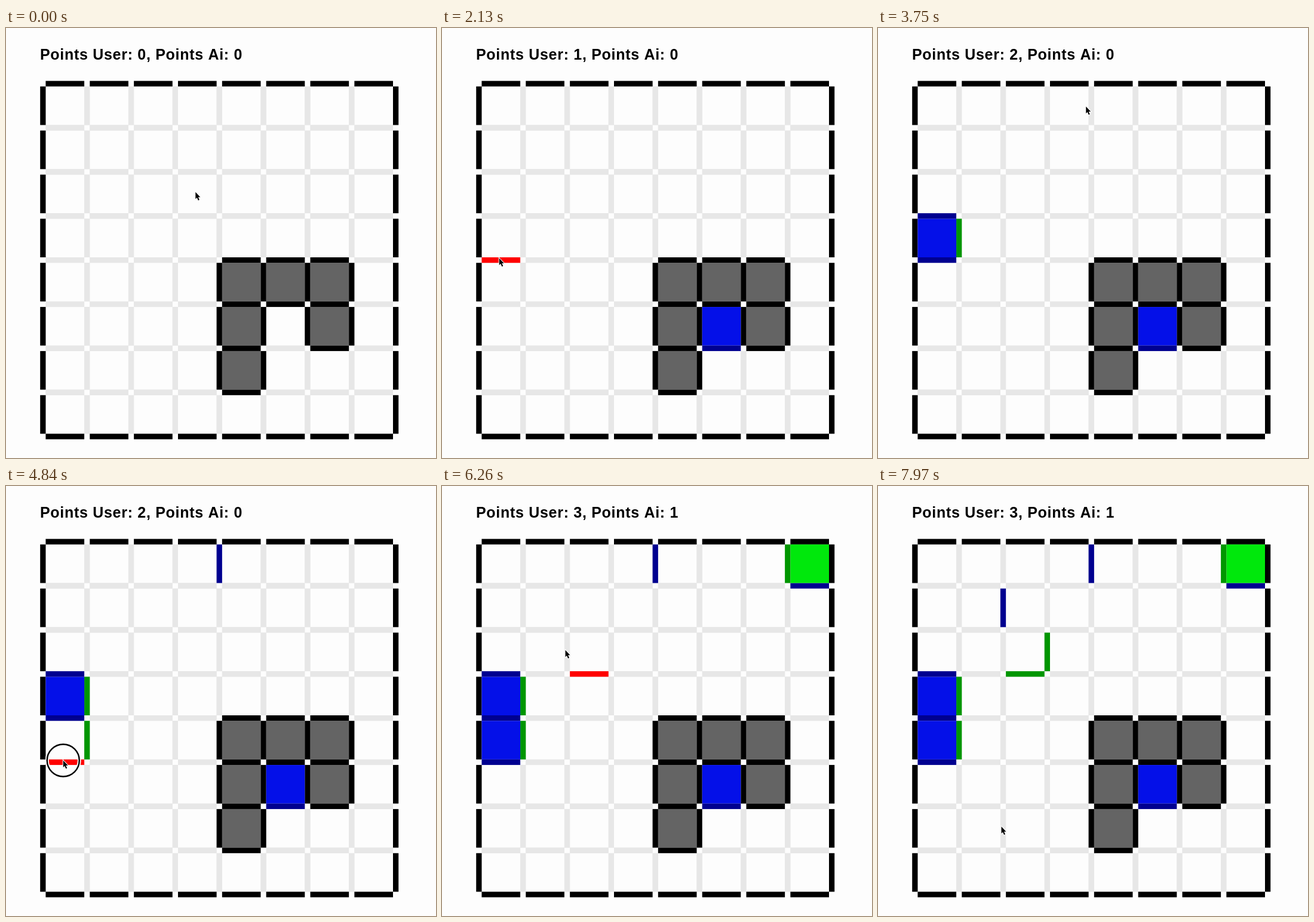
An HTML page with a canvas for the animation above (8 s loop, 720x720 px).

```html
<!DOCTYPE html>
<html lang="en">
<head>
<meta charset="utf-8">
<title>Dots and boxes</title>
<style>
  html, body { margin: 0; width: 100%; height: 100%; overflow: hidden; background: #fdfdfd; }
  canvas { display: block; width: 720px; height: 720px; }
</style>
</head>
<body>
<canvas id="stage" width="720" height="720"></canvas>
<script>
const ctx = document.getElementById('stage').getContext('2d');
const LOOP = 8000, SIZE = 8;
const UNIT = 720 / 390, PITCH = 40 * UNIT, THICK = 5 * UNIT, LEFT = 31 * UNIT, TOP = 48 * UNIT;
const HOLD = 250, LEAVE = 230, PRESS = 150, FLASH = 430;
const COLOR = {
  back: '#fdfdfd', free: '#e7e7e7', wall: '#000', block: '#646464', active: '#f00',
  userLine: '#000090', aiLine: '#009600', userCell: '#0410e8', aiCell: '#00e80c'
};
const BLOCKED = ['4,4', '5,4', '6,4', '4,5', '6,5', '4,6'];

// Spots: h and v are the lines above and left of a cell, c is the cell itself.
const script = [
  [0, 'rest', 'c3,2'],
  [960, 'user', 'h5,6'],
  [2340, 'user', 'h0,4'], [2380, 'ai', 'v1,3'],
  [3130, 'user', 'h0,3'],
  [4040, 'user', 'v4,0'], [4080, 'ai', 'v1,4'],
  [4930, 'user', 'h0,5'],
  [5600, 'user', 'h7,1'], [5640, 'ai', 'v7,0'], [6060, 'ai', 'h2,3'],
  [6300, 'rest', 'v2,2'],
  [6950, 'user', 'v2,1'], [6990, 'ai', 'v3,2'],
  [8200, 'rest', 'v2,6']
].map(([at, who, spot]) => ({ at, who, spot }));
const moves = script.filter(step => step.who !== 'rest');
const stops = script.filter(step => step.who !== 'ai');

const parse = key => key.split(',').map(Number);
const edgesOf = (col, row) =>
  [`h${col},${row}`, `h${col},${row + 1}`, `v${col},${row}`, `v${col + 1},${row}`];

const cells = [], walls = new Set();
for (let i = 0; i < SIZE; i++) {
  for (let j = 0; j < SIZE; j++) cells.push(`${i},${j}`);
  for (const edge of [`h${i},0`, `h${i},${SIZE}`, `v0,${i}`, `v${SIZE},${i}`]) walls.add(edge);
}
for (const key of BLOCKED) edgesOf(...parse(key)).forEach(edge => walls.add(edge));
const openCells = cells.filter(key => !BLOCKED.includes(key));

function rectOf(spot) {
  const [col, row] = parse(spot.slice(1));
  const x = LEFT + PITCH * col, y = TOP + PITCH * row, inner = PITCH - THICK;
  return [
    spot[0] === 'v' ? x : x + THICK,
    spot[0] === 'h' ? y : y + THICK,
    spot[0] === 'v' ? THICK : inner,
    spot[0] === 'h' ? THICK : inner
  ];
}

function paint(spot, color) {
  ctx.fillStyle = color;
  ctx.fillRect(...rectOf(spot));
}

function drawBoard() {
  for (const key of cells) edgesOf(...parse(key)).forEach(edge => paint(edge, COLOR.free));
  for (const key of BLOCKED) paint('c' + key, COLOR.block);
  for (const edge of walls) paint(edge, COLOR.wall);
}

// The player who closes a cell owns it.
function drawMoves(t) {
  const taken = new Set(walls), owned = new Set(), score = { user: 0, ai: 0 };
  for (const { at, who, spot } of moves) {
    const placed = t >= at;
    if (placed) {
      taken.add(spot);
      for (const key of openCells) {
        if (owned.has(key) || !edgesOf(...parse(key)).every(edge => taken.has(edge))) continue;
        owned.add(key);
        score[who]++;
        paint('c' + key, COLOR[who + 'Cell']);
      }
    }
    const start = who === 'user' ? at - HOLD : at;
    const end = who === 'user' ? at : at + FLASH;
    if (t >= start && t < end) paint(spot, COLOR.active);
    else if (placed) paint(spot, COLOR[who + 'Line']);
  }
  return score;
}

function aim(spot) {
  const [x, y, w, h] = rectOf(spot);
  return [x + w / 2 - 3, y + h / 2 - 3];
}

function pointerAt(t) {
  const i = stops.findIndex(stop => stop.at > t);
  const from = stops[i - 1], to = stops[i];
  const start = from.at + LEAVE, end = to.at - HOLD;
  const p = Math.min(1, Math.max(0, (t - start) / (end - start)));
  const ease = p * p * (3 - 2 * p);
  const [x0, y0] = aim(from.spot), [x1, y1] = aim(to.spot);
  return [x0 + (x1 - x0) * ease, y0 + (y1 - y0) * ease];
}

function drawRing(x, y) {
  ctx.beginPath();
  ctx.arc(x, y, 27, 0, Math.PI * 2);
  for (const [color, width] of [[COLOR.back, 6], ['#000', 2.4]]) {
    ctx.strokeStyle = color;
    ctx.lineWidth = width;
    ctx.stroke();
  }
}

const arrow = new Path2D('M0 0V11.5L2.5 9.2L4.5 13.8L6.5 13L4.5 8.5H8Z');
function drawPointer(x, y) {
  ctx.save();
  ctx.translate(x, y);
  ctx.strokeStyle = COLOR.back;
  ctx.lineWidth = 2;
  ctx.stroke(arrow);
  ctx.fillStyle = '#000';
  ctx.fill(arrow);
  ctx.restore();
}

function frame(now) {
  const t = now % LOOP;
  ctx.fillStyle = COLOR.back;
  ctx.fillRect(0, 0, 720, 720);
  drawBoard();
  const score = drawMoves(t);

  ctx.fillStyle = '#000';
  ctx.font = 'bold 25px "Liberation Sans", Arial, sans-serif';
  ctx.letterSpacing = '0.7px';
  ctx.fillText(`Points User: ${score.user}, Points Ai: ${score.ai}`, 57, 53);

  const [x, y] = pointerAt(t);
  const pressed = moves.some(({ at, who }) => who === 'user' && t >= at - PRESS && t < at);
  if (pressed) drawRing(x, y);
  drawPointer(x, y);
  requestAnimationFrame(frame);
}
requestAnimationFrame(frame);
</script>
</body>
</html>
```
